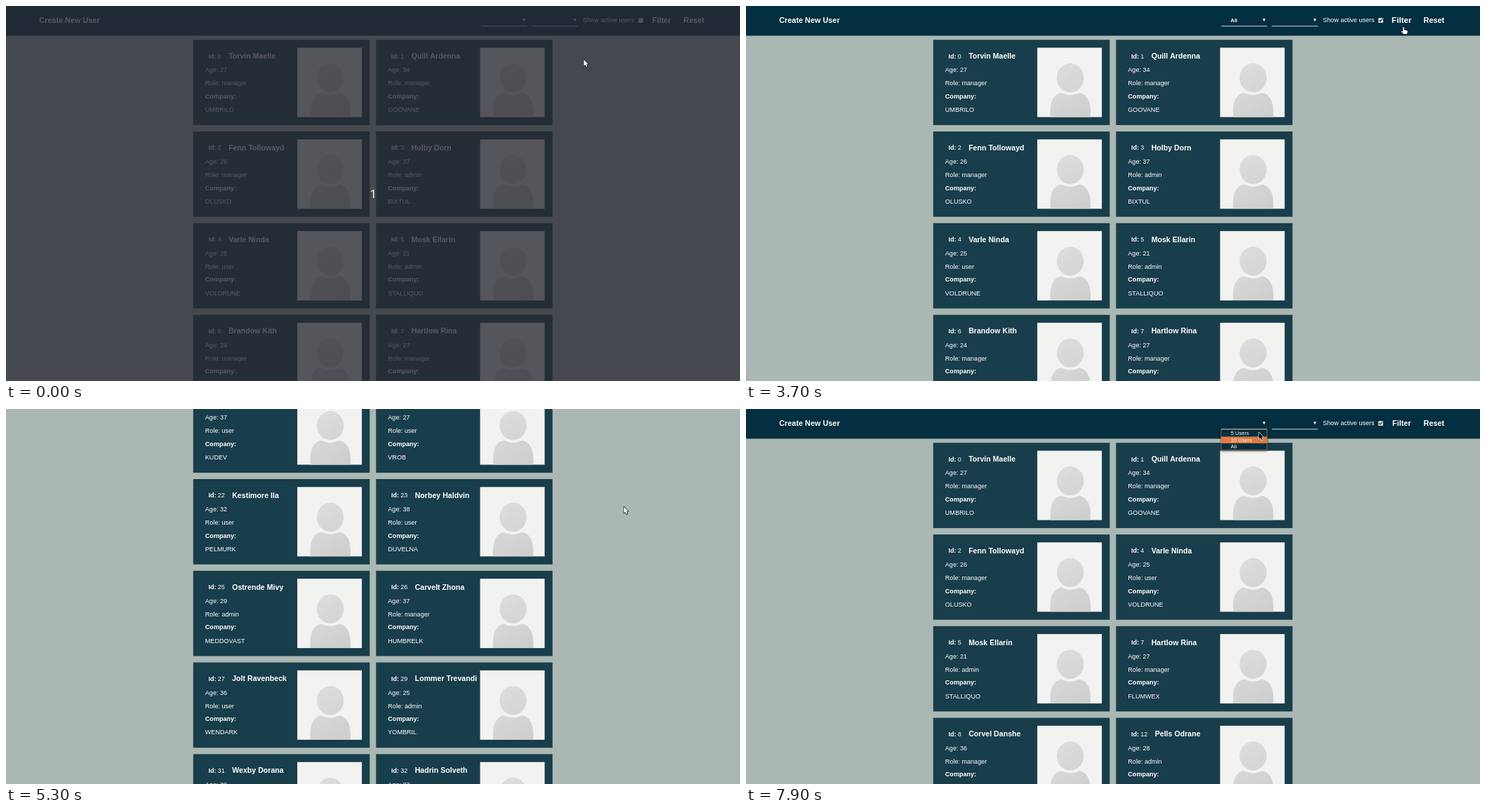
An HTML page with a canvas that plays this animation: 1046x535 px, repeating every 8000 ms.

```html
<!DOCTYPE html>
<html lang="en">
<head>
<meta charset="utf-8">
<title>User list</title>
<style>
  html, body { margin: 0; height: 100%; overflow: hidden; background: #aab7b2; }
  canvas { display: block; }
</style>
</head>
<body>
<canvas id="stage" width="1046" height="535"></canvas>
<script>
const ctx = document.getElementById('stage').getContext('2d');
const W = 1046, H = 535, LOOP = 8000, TICK = 100;
const ROW = 130.8, COLUMN = 260.5, OPTION = 9.45;
const BG = '#aab7b2', HEADER = '#042f40', CARD = '#183d4b', ORANGE = '#e27b41';
const SANS = '"Liberation Sans", Arial, sans-serif';
const BODY = 9.07, TITLE = 10.61, NAV = 10.88, SMALL = 7.56;

// id, name, age, role, company
const users = `0,Torvin Maelle,27,manager,UMBRILO
1,Quill Ardenna,34,manager,GOOVANE
2,Fenn Tollowayd,26,manager,OLUSKO
3,Holby Dorn,37,admin,BIXTUL
4,Varle Ninda,25,user,VOLDRUNE
5,Mosk Ellarin,21,admin,STALLIQUO
6,Brandow Kith,24,manager,KELVORD
7,Hartlow Rina,27,manager,FLUMWEX
8,Corvel Danshe,36,manager,GRELPY
12,Pells Odrane,28,admin,QUANDOVIL
13,Tindaro Brosk,28,admin,ULVANTO
16,Gostwiner Pelly,39,user,SOBRIK
18,Druse Halvenor,37,user,KUDEV
19,Yarne Solva,27,user,VROB
22,Kestimore Ila,32,user,PELMURK
23,Norbey Haldvin,38,user,DUVELNA
25,Ostrende Mivy,29,admin,MEDDOVAST
26,Carvelt Zhona,37,manager,HUMBRELK
27,Jolt Ravenbeck,36,user,WENDARK
29,Lommer Trevandi,25,admin,YOMBRIL
31,Wexby Dorana,30,user,TROVIND
32,Hadrin Solveth,33,manager,OSKALUM`.split('\n').map(line => line.split(','));
const activeUsers = users.filter(([id]) => id !== '3' && id !== '6');

const clamp = (v, lo, hi) => Math.min(hi, Math.max(lo, v));

// The pointer rests between moves; each move glides to a place in [start, end]
const moves = [
  { start: 400, end: 800, to: [735, 14] },     // page size select
  { start: 1200, end: 1400, to: [734, 49.5] }, // "All" option
  { start: 1600, end: 1700, to: [718, 49] },
  { start: 1900, end: 2300, to: [754, 40] },   // across the second card
  { start: 2300, end: 2400, to: [823, 39] },
  { start: 2500, end: 3000, to: [882, 16] },   // checkbox label
  { start: 3300, end: 3700, to: [936.5, 29.5] }, // Filter
  { start: 4400, end: 4700, to: [880, 139] },
  { start: 7000, end: 7600, to: [735, 19] },   // select again
  { start: 7800, end: 7900, to: [730.5, 33] }
];

function pointerAt(t) {
  return moves.reduce(([x, y], { start, end, to }) => {
    const k = clamp((t - start) / (end - start), 0, 1);
    return [x + (to[0] - x) * k, y + (to[1] - y) * k];
  }, [823, 76]);
}

// Steady wheel down, slower wheel up, then a jump to near the top
function scrollAt(t) {
  if (t < 5900) return Math.round(clamp((t - 4833) * 1.57, 0, 733));
  if (t < 6400) return Math.max(523, 733 - (t - 5900) * 1.05);
  return t < 6900 ? 10 : 0;
}

function rect(x, y, w, h, color) {
  ctx.fillStyle = color;
  ctx.fillRect(x, y, w, h);
}

function text(str, x, y, size = BODY, weight = 'normal') {
  ctx.font = `${weight} ${size}px ${SANS}`;
  ctx.fillStyle = '#fff';
  ctx.fillText(str, x, y);
}

const torso = new Path2D('M18.5 99V90C18.5 76 24 66 34 64.3Q47 71 60 64.3C70 66 75.8 76 75.8 90V99Z');
const arrow = new Path2D('M0 0V9.2L2.1 7.3 3.7 10.6 5 10 3.6 6.8H6.3Z');
const hand = new Path2D('M-.8 .5Q0-.6 .8 .5V4L5 5Q6 5.3 5.8 6.5L5 10H0L-3.2 6.3Q-3 5-.8 6.6Z');
const check = new Path2D('M902.3 20.2L904 22 906.8 18.3');
const triangle = new Path2D('M736.3 18.2H740.3L738.3 22.3Z');

function portrait(x, y) {
  ctx.save();
  ctx.translate(x, y);
  rect(0, 0, 92, 99, '#f2f2f1');
  const shade = ctx.createLinearGradient(25, 22, 75, 99);
  shade.addColorStop(0, '#dedede');
  shade.addColorStop(1, '#cdcdcd');
  ctx.fillStyle = shade;
  ctx.beginPath();
  ctx.ellipse(47, 43, 19.2, 20.7, 0, 0, 7);
  ctx.fill();
  ctx.fill(torso);
  ctx.restore();
}

function card([id, name, age, role, company], x, y, hovered) {
  ctx.save();
  if (hovered) Object.assign(ctx, { shadowColor: '#000', shadowBlur: 3, shadowOffsetX: 2.5, shadowOffsetY: 2.5 });
  rect(x, y, 251.5, 121.7, CARD);
  ctx.restore();
  text('Id:', x + 21.7, y + 26.4, BODY, 'bold');
  text(id, x + 35, y + 26.4);
  text(name, x + 45.3 + 5.04 * id.length, y + 26.8, TITLE, 'bold');
  text('Age: ' + age, x + 17, y + 46.2);
  text('Role: ' + role, x + 17, y + 65);
  text('Company:', x + 17, y + 83.6, BODY, 'bold');
  text(company, x + 17, y + 102.7);
  portrait(x + 148.3, y + 11.3);
}

function select(offset, value) {
  ctx.save();
  ctx.translate(offset, 0);
  rect(677, 28.3, 65.5, 0.9, '#dfe5e7');
  text(value, 690.5, 22.8, SMALL, 'bold');
  ctx.fill(triangle);
  ctx.restore();
}

function header(checked, size, overFilter) {
  rect(0, 0, W, 42.4, HEADER);
  text('Create New User', 47.2, 24, NAV, 'bold');
  select(0, size);
  select(72.4, '');
  text('Show active users', 822, 23.3);
  rect(901, 17, 7, 7, '#8b9196');
  rect(901.5, 17.5, 6, 6, checked ? '#fff' : '#e4e6e7');
  if (checked) {
    ctx.strokeStyle = '#222';
    ctx.lineWidth = 1.3;
    ctx.stroke(check);
  }
  const grow = overFilter ? 1.07 : 1;
  text('Filter', 934.3 - 13.3 * grow, 20 + 4 * grow, NAV * grow, 'bold');
  text('Reset', 965.6, 24, NAV, 'bold');
}

function optionList(active) {
  ctx.save();
  Object.assign(ctx, { shadowColor: 'rgba(0,0,0,.5)', shadowBlur: 3, shadowOffsetY: 1 });
  rect(677, 29.2, 65.5, 29.4, HEADER);
  ctx.restore();
  if (active >= 0) rect(677, 30 + active * OPTION, 65.5, OPTION, ORANGE);
  ['5 Users', '10 Users', 'All'].forEach((label, i) => text(label, 690.8, 37.2 + i * OPTION, SMALL));
  ctx.strokeStyle = '#c0785a';
  ctx.lineWidth = 0.7;
  ctx.strokeRect(677, 29.2, 65.5, 29.4);
}

function pointer(x, y, shape, dark) {
  ctx.save();
  ctx.translate(x + 0.5, y + 0.5);
  ctx.lineJoin = 'round';
  ctx.lineWidth = 1.4;
  ctx.fillStyle = dark ? '#000' : '#fff';
  ctx.strokeStyle = dark ? '#ddd' : '#111';
  ctx.stroke(shape);
  ctx.fill(shape);
  ctx.restore();
}

function draw(t) {
  const [x, y] = pointerAt(t);
  const scroll = scrollAt(t);
  const overFilter = x > 916 && y < 36;
  const listOpen = (t >= 1000 && t < 1900) || t >= 7600;
  const option = t >= 7900 ? 1 : Math.floor((y - 30) / OPTION);

  rect(0, 0, W, H, BG);
  ctx.save();
  ctx.translate(0, -scroll);
  (t < 4200 ? users : activeUsers).forEach((user, i) => {
    const top = 48.2 + (i >> 1) * ROW;
    const hovered = i === 1 && t >= 2000 && t < 2400;
    if (top < scroll + H && top + ROW > scroll) card(user, 266.8 + (i % 2) * COLUMN, top, hovered);
  });
  header(t >= 3000, t >= 1900 && t < 4200 ? 'All' : '', overFilter);
  if (listOpen) optionList(option);
  ctx.restore();

  if (t < 400) {
    rect(0, 0, W, H, 'rgba(42,42,50,.78)');
    ctx.font = '17px "Noto Sans", "Open Sans", sans-serif';
    ctx.fillStyle = '#fff';
    ctx.fillText('1', 518.6, 273.8);
  }
  pointer(x, y, overFilter ? hand : arrow, listOpen && y > 28);
}

function frame() {
  const t = performance.now() % LOOP;
  draw(Math.floor(t / TICK) * TICK);
  requestAnimationFrame(frame);
}
frame();
</script>
</body>
</html>
```
